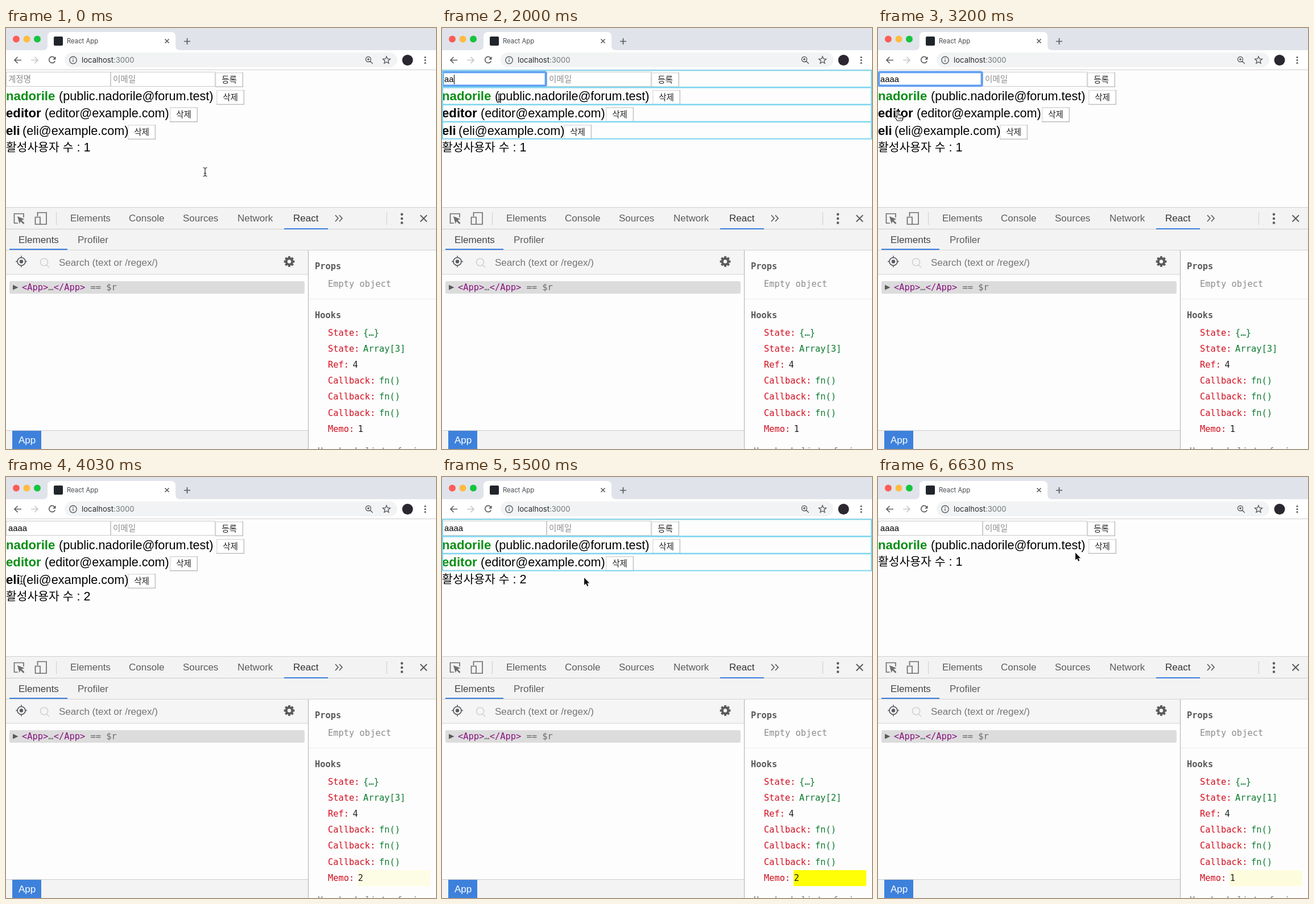
An HTML page that plays this animation: 756x740 px, repeating every 6.66 s.

```html
<!DOCTYPE html>
<html lang="ko">
<head>
<meta charset="utf-8">
<title>React App</title>
<style>
  html, body { margin: 0; width: 100%; height: 100%; overflow: hidden; background: #fdfdfd; }
  svg { display: block; }
  text { white-space: pre; font-family: "Liberation Sans", Arial, sans-serif; }
  .ui { font-family: Inter, sans-serif; }
  .ko { font-family: "Noto Sans CJK KR", "Noto Sans CJK", sans-serif; }
  .mono { font: 15.4px "DejaVu Sans Mono", monospace; }
  .tool { font-size: 17px; fill: #5c5c5c; }
  .page { font-size: 21.6px; }
  .name { font-size: 22.2px; font-weight: bold; }
  .field { font-size: 14.5px; }
  .icon { fill: none; stroke: #5a5d61; stroke-width: 1.7; }
  .ring { fill: none; stroke: #5d9df3; stroke-width: 3; }
  .halo { fill: none; stroke: #5d9df3; stroke-width: 5; opacity: .4; }
</style>
</head>
<body>
<svg id="stage" width="756" height="740" viewBox="0 0 756 740"></svg>
<script>
const LOOP = 6660;
const ROW = 30.5;
const TYPED = [1430, 1980, 2230, 2430];
const FOCUS = [880, 3330];
const TRACE_MS = 300;
const FLASH_MS = 1000;

// [time, active users, listed users]
const CHANGES = [[3380, 2, 3], [4640, 3, 3], [5490, 2, 2], [6030, 1, 1]];
const UPDATES = [...TYPED, ...CHANGES.map(c => c[0])];

const USERS = [
  { name: 'nadorile', mail: 'public.nadorile@forum.test', mailX: 93, buttonX: 370, active: 0 },
  { name: 'editor', mail: 'editor@example.com', mailX: 68, buttonX: 288, active: 3380, press: [5860, 6030] },
  { name: 'eli', mail: 'eli@example.com', mailX: 29, buttonX: 214, active: 4640, press: [5410, 5490] },
];

// Pointer stops: [arrival time, x, y, shape]
const POINTER = [
  [0, 350, 253, 'beam'], [30, 350, 253, 'beam'], [100, 246, 129, 'beam'],
  [300, 246, 129, 'beam'], [460, 128, 108, 'beam'],
  [1730, 128, 108, 'beam'], [1980, 100, 123, 'beam'],
  [2860, 100, 123, 'beam'], [3130, 35, 146, 'hand'],
  [3720, 35, 146, 'hand'], [3980, 27, 181, 'beam'],
  [4260, 27, 181, 'beam'], [4460, 17, 177, 'hand'],
  [4720, 17, 177, 'hand'], [4980, 345, 146, 'arrow'],
  [5060, 345, 146, 'arrow'], [5360, 250, 177, 'arrow'],
  [5540, 250, 177, 'arrow'], [5780, 330, 143, 'arrow'],
  [6060, 330, 143, 'arrow'], [6300, 347, 133, 'arrow'], [LOOP, 347, 133, 'arrow'],
];

const rect = (x, y, w, h, fill, more = '') =>
  `<rect x="${x}" y="${y}" width="${w}" height="${h}" fill="${fill}" ${more}/>`;
const circle = (x, y, r, fill) => `<circle cx="${x}" cy="${y}" r="${r}" fill="${fill}"/>`;
const text = (x, y, content, cls, fill = '', more = '') =>
  `<text x="${x}" y="${y}" class="${cls}" ${fill && `style="fill:${fill}"`} ${more}>${content}</text>`;
const icon = (d, more = '') => `<path class="icon" d="${d}" ${more}/>`;
const ring = (x, y, w, h) => ['halo', 'ring'].map(cls =>
  `<rect class="${cls}" x="${x}" y="${y}" width="${w}" height="${h}" rx="2"/>`).join('');
const dots = (x, y, gap, r) => [-1, 0, 1].map(i => circle(x, y + i * gap, r, '#5a5d61')).join('');

const input = x => rect(x + .5, 77.5, 183, 25, '#fff', 'stroke="#cbcbcb"');
const button = (x, y, label) =>
  rect(x, y, 49, 26, '#bdbdbd') + rect(x, y, 47.5, 24.5, '#dedede') + rect(x + 1.5, y + 1.5, 46, 23, '#fff') +
  text(x + 24.5, y + 17.5, label, 'ko field', '#222', 'text-anchor="middle"');

function browserBar() {
  return rect(0, 0, 756, 39, '#e0e3ea') + rect(0, 39, 756, 35, '#fff') +
    circle(18, 19.5, 6, '#fc5d57') + circle(36.5, 19.5, 6, '#fdbc40') + circle(55, 19.5, 6, '#16c43f') +
    '<path fill="#fff" d="M65 39Q73 39 73 31V15Q73 7 81 7H290Q298 7 298 15V31Q298 39 306 39Z"/>' +
    rect(84, 15, 16, 16, '#20252b', 'rx="2"') +
    text(107, 27, 'React App', 'ui', '#45494d', 'font-size="11.3"') +
    icon('M279.5 19.5l7 7m0-7l-7 7', 'stroke-width="1.4"') + icon('M313 23.5h11m-5.5-5.5v11') +
    icon('M27 56.5H15m5.5-5.5l-5.5 5.5 5.5 5.5') +
    icon('M44 56.5h12m-5.5-5.5l5.5 5.5-5.5 5.5', 'style="stroke:#c4c6c9"') +
    icon('M85.5 52.5A5.5 5.5 0 1 0 86.3 58') + '<path fill="#5a5d61" d="M87.5 50v5.5H82z"/>' +
    rect(103, 43, 585, 26, '#f1f3f4', 'rx="13"') +
    icon('M124.2 56.5a6.2 6.2 0 1 0-12.4 0a6.2 6.2 0 1 0 12.4 0M118 55.5v4M118 52.7v1.5', 'style="stroke-width:1.4"') +
    text(133, 61, '<tspan>localhost</tspan><tspan fill="#73777b">:3000</tspan>', 'ui', '', 'font-size="13.1" fill="#292c30"') +
    icon('M641.5 55a4.5 4.5 0 1 0-9 0a4.5 4.5 0 1 0 9 0M640.3 58.3l4.5 4.5M635 55h4m-2-2v4', 'style="stroke-width:1.4"') +
    icon('M669 50l1.8 4.2 4.6.4-3.5 3 1.1 4.5-4-2.4-4 2.4 1.1-4.5-3.5-3 4.6-.4z', 'style="stroke-width:1.4"') +
    circle(706, 56.5, 9.5, '#2b2730') + dots(737, 56.5, 5, 1.6) +
    rect(0, 73, 756, 1, '#cfcfcf');
}

function devtools() {
  const tabs = [[113, 'Elements'], [216, 'Console'], [311, 'Sources'], [407, 'Network']];
  const spokes = [...Array(8)].map((_, i) =>
    `<rect x="-2" y="-9.3" width="4" height="5" transform="rotate(${i * 45})"/>`).join('');
  return rect(0, 315, 756, 76, '#f3f3f3') + rect(0, 315, 756, 1, '#d0d0d0') +
    rect(0, 353, 756, 1, '#cccccc') + rect(0, 390, 756, 1, '#d4d4d4') +
    icon('M31 333v-6.500H14.500V343H21', 'style="stroke:#6e6e6e"') +
    '<path fill="#6e6e6e" d="M20 331l12.500 5-5 1.800 5 5-2 2-5-5-1.800 4.500z"/>' +
    icon('M55.500 331v-6.500H71V345H60M51.500 332.500H60V345H51.500Z', 'style="stroke:#6e6e6e"') +
    rect(88, 324, 1, 22, '#ccc') + rect(669, 324, 1, 22, '#ccc') +
    tabs.map(([x, label]) => text(x, 340, label, 'tool')).join('') +
    text(505, 340, 'React', 'tool', '#333') + rect(489, 352, 77, 2, '#3b7ddd') +
    icon('M579 329l5 5.500-5 5.500m7-11l5 5.500-5 5.500') + dots(696, 335, 7.5, 2.2) +
    icon('M728.500 329l11.500 11.500m0-11.500l-11.500 11.500', 'style="stroke-width:2"') +
    text(22, 377.5, 'Elements', 'tool', '#444') + text(126, 377.5, 'Profiler', 'tool') + rect(6, 388, 102, 2, '#3b7ddd') +
    rect(0, 391, 531, 42, '#f5f5f5') + rect(0, 432.5, 531, 1, '#d4d4d4') +
    icon('M34 410.500a7 7 0 1 0-14 0a7 7 0 1 0 14 0M27 400.500v4m0 12v4M17 410.500h4m12 0h4') + circle(27, 410.5, 3.2, '#5a5d61') +
    icon('M73.500 411.500a6.500 6.500 0 1 0-13 0a6.500 6.500 0 1 0 13 0M71.500 416.500l4.500 4.500', 'style="stroke:#d2d2d2"') +
    text(93, 418, 'Search (text or /regex/)', 'tool', '#757575') +
    `<g transform="translate(498 410.500)" fill="#5a5a5a">${spokes}</g>` +
    '<circle cx="498" cy="410.500" r="5.200" fill="none" stroke="#5a5a5a" stroke-width="4"/>' +
    rect(6, 445, 519, 22, '#dcdcdc', 'rx="3"') + '<path fill="#5a5a5a" d="M12 451.500l9.500 4.500-9.500 4.500z"/>' +
    text(28, 461, '<tspan fill="#881280">&lt;App&gt;</tspan>…<tspan fill="#881280">&lt;/App&gt;</tspan> == $r', 'mono', '', 'fill="#6a6a6a"') +
    rect(0, 707, 531, 33, '#f3f3f3') + rect(0, 707, 531, 1, '#ccc') +
    rect(11, 708, 51, 32, '#3d81dc') + text(22, 730, 'App', 'tool', '#fff') +
    rect(531, 391, 1, 349, '#b0b0b0');
}

function hooksPane({ count, listed, flash }) {
  const green = '#0b7a2f', dark = '#222';
  const hooks = [
    ['State:', '{…}', green], ['State:', `Array[${listed}]`, green], ['Ref:', 4, dark],
    ['Callback:', 'fn()', green], ['Callback:', 'fn()', green], ['Callback:', 'fn()', green],
    ['Memo:', count, dark],
  ];
  return text(543, 424, 'Props', 'mono', '#5a5a5a', 'font-weight="bold" style="font-weight:bold"') +
    text(566, 455, 'Empty object', 'mono', '#8c8c8c') +
    rect(532, 476, 224, 1, '#ececec') +
    text(543, 510, 'Hooks', 'mono', '#5a5a5a') +
    rect(618, 691, 128, 28, '#ffff00', `opacity="${flash}"`) +
    hooks.map(([label, value, color], i) => {
      const y = 541 + i * 28.1;
      return text(566, y, label, 'mono', '#d00f20') +
        text(566 + label.length * 9.27 + 6.5, y, value, 'mono', color);
    }).join('') +
    text(548, 749, 'Use hook list of views', 'mono', '#777');
}

function form(t, typed) {
  const focused = t >= FOCUS[0] && t < FOCUS[1];
  const caretX = 4.5 + typed * 8.23;
  const caretOn = focused && t < 2930;
  return input(0) + input(184) +
    (typed ? text(4, 95, 'a'.repeat(typed), '', '', 'font-size="14.8"') : text(4, 95, '계정명', 'ko field', '#8c8c8c')) +
    text(188, 95, '이메일', 'ko field', '#8c8c8c') + button(368, 78, '등록') +
    (focused ? ring(1.5, 77.5, 181, 24) : '') +
    (caretOn ? rect(caretX, 82, 1, 17, '#000') : '');
}

function userList(t, { count, listed }) {
  const rows = USERS.slice(0, listed).map((user, i) => {
    const y = 126.5 + i * ROW;
    const pressed = user.press && t >= user.press[0] && t < user.press[1];
    return text(0, y, user.name, 'name', t >= user.active ? '#0a8f14' : '#000') +
      text(user.mailX, y, `(${user.mail})`, 'page') +
      (pressed ? ring(user.buttonX - 1.5, y - 18.5, 51.5, 28.5) : '') +
      button(user.buttonX, y - 17.5, '삭제');
  });
  const y = 125.7 + listed * ROW;
  const hangul = s => `<tspan class="ko" font-size="20.4">${s}</tspan>`;
  return rows.join('') + text(0, y, `${hangul('활성사용자')} ${hangul('수')} : ${count}`, 'page');
}

function traces(t, listed) {
  if (!UPDATES.some(start => t >= start && t < start + TRACE_MS)) return '';
  return [...Array(listed + 1)].map((_, i) =>
    rect(1, 74.5 + i * 30.2, 754, 29.7, 'none', 'stroke="#7fd6f0" stroke-width="2"')).join('');
}

const SHAPES = {
  beam: ['M-3.5-7.500Q0-7.500 0-5Q0-7.500 3.500-7.500M0-5.500V5.500M-3.500 7.500Q0 7.500 0 5Q0 7.500 3.500 7.500M-2 2.500H2'],
  hand: ['M-1.500 1Q0-1 1.500 1V7Q3 5.500 4.300 7.300Q6 6 7 8Q9 7 9 9.500V13Q9 15 7 17H-1Q-3 14-6 10Q-6 8-4 9L-1.500 11Z'],
  arrow: ['M0 0V13L3 10.300L5.200 15L7.400 14L5.300 9.400H9.300Z'],
};

function pointer(t) {
  const next = POINTER.findIndex(stop => stop[0] > t);
  const [t0, x0, y0, shape0] = POINTER[next - 1];
  const [t1, x1, y1, shape1] = POINTER[next];
  const p = (t - t0) / (t1 - t0);
  const s = p * p * (3 - 2 * p);
  const shape = s > .6 ? shape1 : shape0;
  const d = SHAPES[shape][0];
  const paint = {
    beam: `<path d="${d}" fill="none" stroke="#fff" stroke-width="2.800" opacity=".7"/><path d="${d}" fill="none" stroke="#222" stroke-width="1.200"/>`,
    hand: `<path d="${d}" fill="#fff" stroke="#111" stroke-width="1.200"/><path d="M2 11v3.500m2.500-3.500v3.500m2.500-3.500v3.500" stroke="#111"/>`,
    arrow: `<path d="${d}" fill="#111" stroke="#fff" stroke-width="1.800" paint-order="stroke"/>`,
  }[shape];
  return `<g transform="translate(${x0 + (x1 - x0) * s} ${y0 + (y1 - y0) * s})">${paint}</g>`;
}

function stateAt(t) {
  const change = CHANGES.filter(c => c[0] <= t).pop();
  if (!change) return { count: 1, listed: 3, flash: 0 };
  const [start, count, listed] = change;
  return { count, listed, flash: Math.max(0, 1 - (t - start) / FLASH_MS) ** 2.25 };
}

const stage = document.getElementById('stage');
stage.innerHTML = browserBar() + devtools() + '<g id="live"></g>';
const live = document.getElementById('live');
const begin = performance.now();

function draw() {
  const t = Math.max(0, performance.now() - begin) % LOOP;
  const state = stateAt(t);
  const typed = TYPED.filter(time => time <= t).length;
  live.innerHTML = hooksPane(state) + form(t, typed) + userList(t, state) +
    traces(t, state.listed) + pointer(t);
  for (const label of live.querySelectorAll('.mono'))
    if (/^(Props|Hooks)$/.test(label.textContent)) label.style.fontWeight = 'bold';
  requestAnimationFrame(draw);
}
draw();
</script>
</body>
</html>
```
